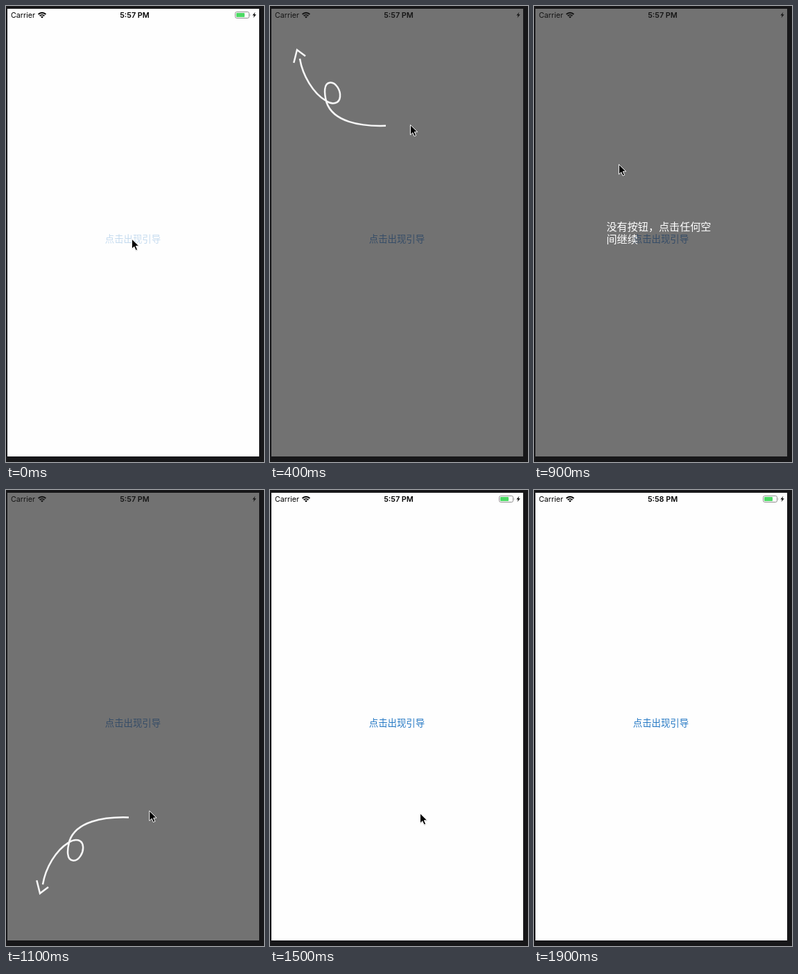
An HTML page that plays this animation: 372 by 658 pixels, repeating every 2400 ms.

```html
<!DOCTYPE html>
<html lang="zh">
<head>
<meta charset="utf-8">
<title>引导</title>
<style>
  html, body { margin: 0; width: 100%; height: 100%; overflow: hidden; background: #171719; }
  svg { display: block; }
  .latin { font-family: Inter, Roboto, sans-serif; }
  .cjk { font-family: "Noto Sans CJK SC", "Noto Sans CJK", sans-serif; }
  .arrow { fill: none; stroke: #f7f7f7; stroke-width: 2.5; }
  #screen { fill: #fefefe; }
  #button { fill: #2478c4; }
  .dim #screen { fill: #727272; }
  .dim #button { fill: #1c3d63; font-weight: 300; opacity: .7; }
  .dim #status { opacity: .82; }
  .dim #battery { visibility: hidden; }
</style>
</head>
<body>
<svg id="stage" width="372" height="658" viewBox="0 0 372 658">
  <defs>
    <g id="swirl" class="arrow">
      <path d="M167 172.8C130 174 91 167 81.5 139C78 126 77 111 87 110.5C95 110 102 122 101 131C100 141 90 143 81 137C62 126 47 100 43 76"/>
      <path d="M34.3 82L39 63.3L51 72.3"/>
    </g>
  </defs>
  <rect id="screen" x="2" y="4" width="363" height="646"/>

  <g id="status">
    <text class="latin" x="7" y="17" font-size="10.7">Carrier</text>
    <g fill="none" stroke="#000" stroke-width="1.9">
      <path d="M46.6 12A7.6 7.6 0 0 1 57.4 12"/>
      <path d="M48.7 14.2A4.7 4.7 0 0 1 55.3 14.2"/>
    </g>
    <path d="M52 17.6L50.1 15.7A2.7 2.7 0 0 1 53.9 15.7Z"/>
    <text id="clock" class="latin" x="185.5" y="17" font-size="10.8" font-weight="600" text-anchor="middle"></text>
    <path d="M359.4 8.8L355.4 13.6H357.8L356.6 17.2L360.7 12.2H358.2Z"/>
  </g>
  <g id="battery">
    <rect x="330.5" y="8.5" width="20" height="9" rx="2.2" fill="none" stroke="#8f8f8f"/>
    <rect x="332" y="10" width="12" height="6" rx=".8" fill="#4cd964"/>
    <path d="M351.8 11.4Q353.4 13 351.8 14.6Z" fill="#8f8f8f"/>
  </g>

  <text id="button" class="cjk" x="142.8" y="341" font-size="13.4">点击出现引导</text>

  <use id="guide1" href="#swirl"/>
  <g id="guide2" class="cjk" font-size="15.1" fill="#fff">
    <text x="104.5" y="324.3">没有按钮，点击任何空</text>
    <text x="104.5" y="341.8">间继续</text>
  </g>
  <use id="guide3" href="#swirl" transform="translate(10 645.3) scale(1 -1)"/>

  <g id="cursor">
    <path d="M.4 1.4V16L3.9 12.8L6.3 18.2L9 17L6.7 11.8H11.3Z" opacity=".2"/>
    <path d="M.4 .6V15L3.8 11.8L6.1 17.1L8.6 16L6.3 10.8H10.7Z" stroke="#fff"/>
  </g>
</svg>
<script>
const LOOP = 2400, STEP = 100;
const $ = id => document.getElementById(id);
const show = (node, on) => on ? node.removeAttribute('visibility') : node.setAttribute('visibility', 'hidden');

// Each guide opens on a tap; the last tap closes the tour
const taps = [100, 500, 1000, 1500];
const CLOCK_TURN = 1900;

const home = { x: 181, y: 335.5 };
const moves = [
  { from: 100, to: 400, x: 202, y: 171 },
  { from: 400, to: 900, x: 122, y: 228 },
  { from: 1000, to: 1200, x: 212, y: 478 },
  { from: 1200, to: 1300, x: 216, y: 466 },
  { from: 1600, to: 1800, x: 250, y: 426 }
];

const easeOut = p => 1 - (1 - p) ** 4;
const clamp = p => Math.min(1, Math.max(0, p));

function pointerAt(t) {
  let { x, y } = home;
  for (const m of moves) {
    const k = easeOut(clamp((t - m.from) / (m.to - m.from)));
    x += (m.x - x) * k;
    y += (m.y - y) * k;
  }
  return `translate(${x} ${y})`;
}

function draw(t) {
  const guide = taps.filter(tap => tap <= t).length % taps.length;
  $('stage').classList.toggle('dim', guide > 0);
  for (let i = 1; i < taps.length; i++) show($('guide' + i), guide === i);

  // The pressed label fades out, then returns under the shade
  $('button').style.opacity = t < taps[0] ? 0.26 : t < taps[0] + STEP ? 0 : '';

  $('clock').textContent = t < CLOCK_TURN ? '5:57 PM' : '5:58 PM';
  show($('cursor'), t < CLOCK_TURN);
  $('cursor').setAttribute('transform', pointerAt(t));
}

const start = performance.now();
function tick() {
  const t = (performance.now() - start) % LOOP;
  draw(Math.floor(t / STEP) * STEP);
  requestAnimationFrame(tick);
}
tick();
</script>
</body>
</html>
```
